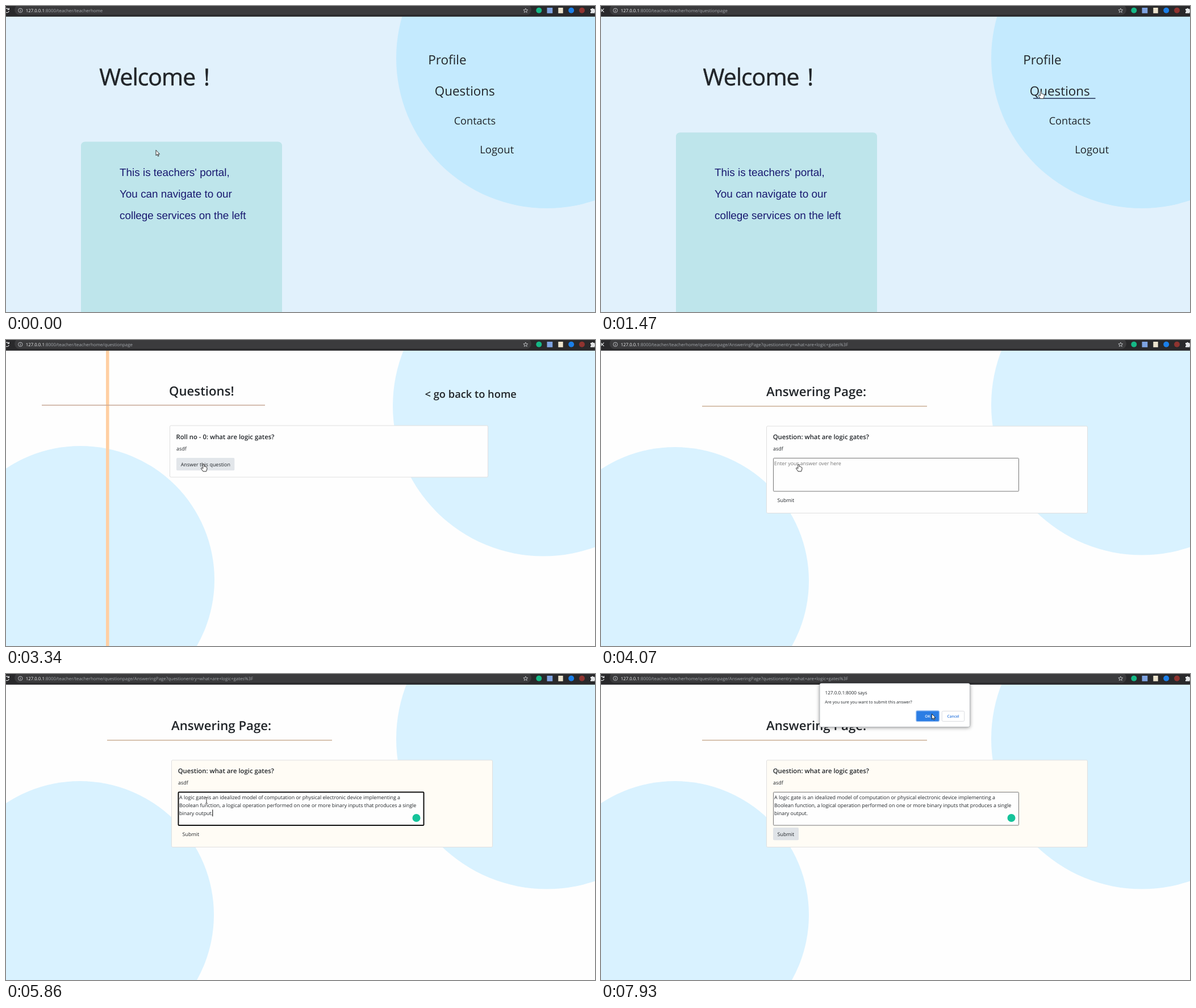
These frames come from a looping animation (1037x540 px, 8 s). An HTML page:

```html
<!DOCTYPE html>
<html lang="en">
<head>
<meta charset="utf-8">
<title>Teacher portal</title>
<style>
  html, body { margin: 0; width: 100%; height: 100%; overflow: hidden; background: #fefefe; }
  svg { display: block; width: 1037px; height: 540px; }
  text {
    font-family: "Open Sans", "Noto Sans", sans-serif; fill: #212529;
    white-space: pre; text-rendering: geometricPrecision;
  }
  .semi { font-weight: 600; }
  .body { font-size: 8.94px; }
  .intro { font: 18.9px "Liberation Sans", Arial, sans-serif; fill: #191970; }
  .url { font-size: 7.84px; fill: #a3a7ab; }
  .card { fill: #fefefe; stroke: #dfdfdf; }
</style>
</head>
<body>
<svg viewBox="0 0 1037 540" xmlns="http://www.w3.org/2000/svg">
  <g id="home">
    <rect width="1037" height="540" fill="#e1f1fc"/>
    <circle cx="952" cy="92" r="265" fill="#c4eafe"/>
    <text id="welcome" x="165" y="140" font-size="41" letter-spacing="-1" word-spacing="5"
      stroke="#212529" stroke-width=".5" stroke-linejoin="round">Welcome !</text>
    <rect id="panel" x="132" y="239" width="354" height="340" rx="7" fill="#bee5eb"/>
    <text class="intro" x="200" y="300">This is teachers' portal,</text>
    <text class="intro" x="200" y="338">You can navigate to our</text>
    <text class="intro" x="200" y="376">college services on the left</text>
    <text x="743.2" y="103" font-size="22.5">Profile</text>
    <text x="754.8" y="158" font-size="22.4">Questions</text>
    <text x="788.7" y="209" font-size="18.1">Contacts</text>
    <text x="834.2" y="260" font-size="18.5">Logout</text>
    <rect id="underline" x="761" y="162.2" height="1.6" fill="#2b3a5c"/>
  </g>

  <g id="list">
    <rect width="1037" height="540" fill="#fefefe"/>
    <circle cx="946" cy="116.5" r="265" fill="#d9f2ff"/>
    <circle cx="131" cy="423" r="236" fill="#d9f2ff"/>
    <rect x="176" y="18" width="5.6" height="522" fill="#ffcfa3"/>
    <rect x="63" y="114.3" width="393" height="1.5" fill="#c8a896"/>
    <text class="semi" x="287" y="98" font-size="22.2">Questions!</text>
    <text class="semi" x="737.5" y="102" font-size="18.3">&lt; go back to home</text>
    <rect class="card" x="288.5" y="151" width="560" height="91" rx="2"/>
    <text class="semi" x="299.5" y="175" font-size="11.3">Roll no - 0: what are logic gates?</text>
    <text class="body" x="300" y="194.8">asdf</text>
    <rect id="answerBtn" x="300" y="208" width="102.3" height="22.3" rx="2" fill="#e2e6ea"/>
    <text class="body" x="307.7" y="222.6">Answer this question</text>
  </g>

  <g id="answer">
    <rect width="1037" height="540" fill="#fefefe"/>
    <circle cx="952" cy="114.5" r="265" fill="#d9f2ff"/>
    <circle cx="130" cy="425" r="236" fill="#d9f2ff"/>
    <rect x="178" y="116.2" width="396" height="1.3" fill="#c4a386"/>
    <text class="semi" x="291" y="99" font-size="22.2">Answering Page:</text>
    <rect id="answerCard" class="card" x="291.5" y="152" width="565" height="153.5" rx="2"/>
    <text class="semi" x="302.7" y="175.3" font-size="11.3">Question: what are logic gates?</text>
    <text class="body" x="303" y="195.3">asdf</text>
    <rect id="field" x="303.5" y="208.5" width="432" height="58.5" rx="1.2" fill="#fefefe"/>
    <text id="hint" class="body" x="304.7" y="221" style="fill:#757575">Enter your answer over here</text>
    <g id="reply">
      <text class="body" x="305" y="221">A logic gate is an idealized model of computation or physical electronic device implementing a</text>
      <text class="body" x="305" y="235.1">Boolean function, a logical operation performed on one or more binary inputs that produces a single</text>
      <text class="body" x="305" y="249.2">binary output.</text>
    </g>
    <circle id="badge" cx="722.5" cy="254" r="7" fill="#15c39a"/>
    <rect id="caret" width="1" height="12" fill="#000"/>
    <rect id="submitBtn" x="303" y="271" width="45" height="22.3" rx="2" fill="#dfe3e7"/>
    <text class="body" x="310.6" y="285.7">Submit</text>
  </g>

  <g id="bar">
    <rect width="1037" height="18.8" fill="#29292b"/>
    <rect x="15" y="-2" width="910" height="17.5" rx="8.7" fill="#3b3b3d"/>
    <g fill="none" stroke="#e4e6e8" stroke-width="1.2">
      <path id="reload" d="M4.3 5.2A3.7 3.7 0 1 0 5.3 9M5.4 3.5V6.4H2.4"/>
      <path id="stop" d="M-1 4.7L5.2 10.9M5.2 4.7L-1 10.9"/>
      <g stroke="#c3c6c9" stroke-width=".9">
        <circle cx="25.3" cy="7.8" r="3.7"/>
        <path d="M25.3 7V10M25.3 5.4V6.3"/>
        <path id="star"/>
      </g>
    </g>
    <text class="url" x="34.8" y="10.6"><tspan fill="#f4f5f6">127.0.0.1</tspan>:8000/teacher/teacherhome<tspan id="path"></tspan></text>
    <circle cx="938.3" cy="7.8" r="5" fill="#15b886"/>
    <rect x="952.5" y="3" width="9.8" height="9.8" fill="#7ea3e0"/>
    <rect x="972.3" y="3" width="8.4" height="9.8" fill="#ece3cd"/>
    <circle cx="995.2" cy="7.8" r="5" fill="#1b7fe8"/>
    <circle cx="1014" cy="7.8" r="5" fill="#8f3430"/>
    <path d="M1029 5h2.3a1.3 1.3 0 1 1 2.6 0h2.6v2.7a1.3 1.3 0 1 1 0 2.6v2.5h-7.5v-2.5a1.3 1.3 0 1 0 0-2.6z" fill="#e4e6e8"/>
  </g>

  <g id="dialog">
    <rect x="385" y="16.5" width="264.5" height="77" rx="3" fill="#fff" stroke="#a9adb1" stroke-width=".8"
      style="filter:drop-shadow(0 1px 3px rgba(0,0,0,.4))"/>
    <text x="394.5" y="36" font-size="8.2">127.0.0.1:8000 says</text>
    <text x="394.3" y="52.4" font-size="7.25">Are you sure you want to submit this answer?</text>
    <rect x="555" y="65" width="40.3" height="18.6" rx="2" fill="#2b7de4" stroke="#82b1f0" stroke-width="1.4"/>
    <text class="semi" x="575" y="76.6" font-size="6.6" text-anchor="middle" style="fill:#fff">OK</text>
    <rect x="600.3" y="65.5" width="39.4" height="18" rx="2" fill="#fff" stroke="#dadce0"/>
    <text class="semi" x="620" y="76.6" font-size="6.6" text-anchor="middle" style="fill:#2a76dd">Cancel</text>
  </g>

  <g id="cursor" stroke="#1b1b1b" stroke-width=".9" stroke-linejoin="round" fill="#fff">
    <path id="arrow" d="M0 .3V9.8L2.2 7.8L3.6 11.2L5.1 10.5L3.7 7.3H6.5Z"/>
    <path id="hand" d="M-1.2 8.4V1.4Q0-.4 1.2 1.4V4.8Q2.2 4.2 2.8 5.2Q4 4.8 4.4 5.8Q5.9 5.6 5.9 7.2V9.4L4.6 13.4H-1L-4.4 8.4Q-4.7 6.6-2.8 7.2Z"/>
    <path id="beam" fill="none" d="M-2-5.5Q0-5.5 0-4.5Q0-5.5 2-5.5M0-4.5V4.5M-2 5.5Q0 5.5 0 4.5Q0 5.5 2 5.5"/>
  </g>
</svg>
<script>
const LOOP = 8000;
const $ = id => document.getElementById(id);
const set = (id, attrs) => { for (const k in attrs) $(id).setAttribute(k, attrs[k]); };
const show = (id, on) => { $(id).style.display = on ? "" : "none"; };
const clamp = v => Math.max(0, Math.min(1, v));
const smooth = p => p * p * (3 - 2 * p);
const span = (t, a, b) => clamp((t - a) / (b - a));

// The screen refreshes in bursts: first time, last time, count.
const bursts = [
  [0, 0, 1], [150, 280, 2], [420, 780, 4], [930, 930, 1], [1080, 1200, 2], [1350, 1590, 3],
  [1730, 1730, 1], [1980, 2340, 4], [2490, 3220, 7], [3340, 3340, 1], [3710, 4330, 6],
  [4480, 4730, 3], [5110, 5350, 3], [5500, 6220, 7], [6350, 6350, 1], [6490, 7210, 7], [7330, 7930, 6]
];
const ticks = bursts.flatMap(([a, b, n]) =>
  Array.from({ length: n }, (_, i) => n > 1 ? Math.round((a + (b - a) * i / (n - 1)) / 10) * 10 : a));
const lastTick = t => ticks.reduce((best, k) => k <= t ? k : best, 0);

// Pointer route: time, x, y
const route = [
  [0, 264, 254], [80, 264, 254], [420, 410, 212], [780, 774, 150], [930, 774.5, 150],
  [1080, 775, 146], [1200, 774.5, 150], [1850, 774.5, 150], [2340, 438, 218],
  [2980, 348, 217.5], [3340, 348, 218.5], [4190, 348, 218.5], [4200, 348, 223],
  [4480, 353, 223], [5860, 353, 223], [6220, 326, 284], [6350, 325, 285],
  [7210, 325, 285], [7930, 582.5, 70]
];

function pointer(t) {
  const i = route.findIndex(k => k[0] > t);
  if (i < 0) return route[route.length - 1].slice(1);
  const [a, x, y] = route[i - 1], [b, u, v] = route[i];
  const p = smooth(span(t, a, b));
  return [x + (u - x) * p, y + (v - y) * p];
}

function pointerKind(t, x, y) {
  if (t < 1980) return t >= 780 ? "hand" : "arrow";
  if (t < 4200) return x < 402 ? "hand" : "arrow";
  if (t < 7330) return y < 267 ? "beam" : "hand";
  return "arrow";
}

function draw(time) {
  const t = lastTick(time);
  const onHome = t < 1590, onAnswer = t >= 3950;
  show("home", onHome);
  show("list", !onHome && !onAnswer);
  show("answer", onAnswer);

  const lift = smooth(span(t, 60, 780));
  set("welcome", { x: 164.3 + 15.3 * lift });
  set("panel", { y: 239.5 - 16.3 * lift });
  const grow = 1 - (1 - span(t, 740, 1470)) ** 2;
  set("underline", { width: 109.5 * grow });

  const loading = t >= 1350 && t < 1730 || t >= 3710 && t < 4070;
  show("stop", loading);
  show("reload", !loading);
  $("path").textContent = t < 1350 ? "" : "/questionpage" +
    (t < 3710 ? "" : "/AnsweringPage?questionentry=what+are+logic+gates%3F");

  const [x, y] = pointer(t), kind = pointerKind(t, x, y);
  set("cursor", { transform: `translate(${x} ${y})` });
  for (const k of ["arrow", "hand", "beam"]) show(k, k === kind);

  show("answerBtn", t >= 1980 && kind === "hand");
  set("answerCard", { style: `fill:${t >= 4200 ? "#fffcf5" : "#fefefe"}` });
  const focus = t >= 4480 && t < 6490, filled = t >= 5110;
  set("field", { stroke: focus ? "#101010" : "#767676", "stroke-width": focus ? 2 : 1 });
  show("hint", !filled);
  show("reply", filled);
  show("badge", t >= 5230);
  const blink = Math.floor((t - (filled ? 4860 : 4480)) / 500) % 2 === 0;
  show("caret", focus && blink);
  set("caret", filled ? { x: 363.3, y: 239.3 } : { x: 305, y: 211.5 });
  show("submitBtn", t >= 6350);
  show("dialog", t >= 6610);
}

const starPoint = i => {
  const r = i % 2 ? 1.8 : 4.1, a = (i / 5 - .5) * Math.PI;
  return (914.8 + r * Math.cos(a)).toFixed(2) + " " + (8.1 + r * Math.sin(a)).toFixed(2);
};
set("star", { d: "M" + Array.from({ length: 10 }, (_, i) => starPoint(i)).join("L") + "Z" });

const start = performance.now();
function frame() {
  draw((performance.now() - start) % LOOP);
  requestAnimationFrame(frame);
}
frame();
</script>
</body>
</html>
```
